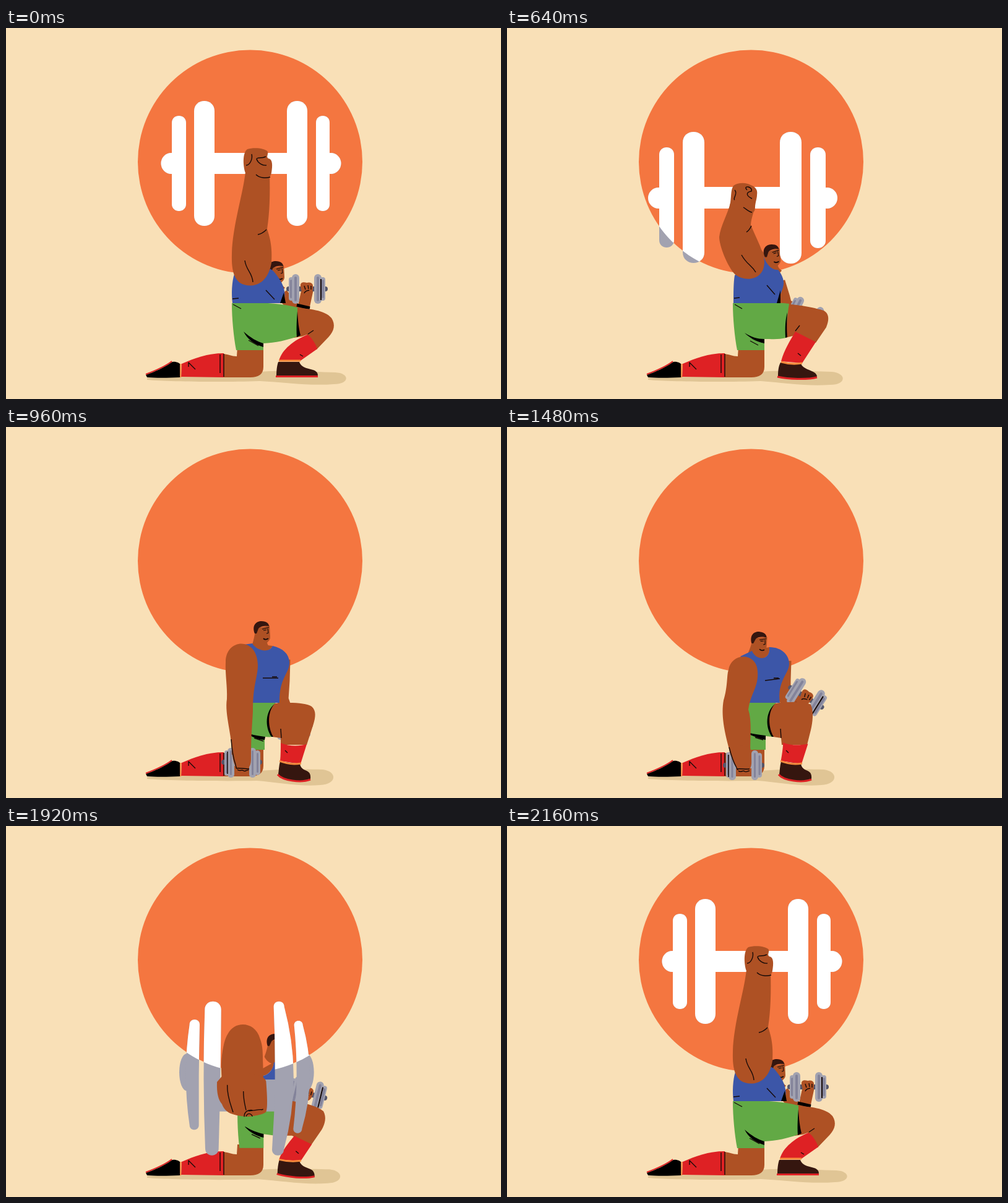
An HTML page with a canvas for the animation above (2600 ms loop, 800 by 600 pixels).

```html
<!DOCTYPE html>
<html>
<head>
<meta charset="utf-8">
<style>
html, body { margin: 0; height: 100%; overflow: hidden; background: #f9e0b7; }
canvas { display: block; }
</style>
</head>
<body>
<canvas id="stage" width="800" height="600"></canvas>
<script>
const g = document.getElementById('stage').getContext('2d');
const SKIN = '#ae5124', RED = '#de2124', BLUE = '#3c56a8', GREEN = '#62a945', DARK = '#35160f',
  INK = '#160a08', STEEL = '#a2a2b0', SHADE = '#83839a', ORANGE = '#f47640';

// Times at which the picture changes, and the key poses in between.
const steps = [0, 480, 560, 640, 680, 720, 800, 880, 960, 1240, 1320, 1400, 1480, 1560, 1640, 1760, 1840, 1920, 2000, 2080, 2160];
const keys = [[0, 'A'], [400, 'A'], [640, 'B'], [680, 'I'], [720, 'G'], [960, 'C'], [1160, 'C'], [1480, 'D'],
  [1760, 'E'], [2000, 'F'], [2080, 'H'], [2160, 'A'], [2600, 'A']];

const shadow = {
  A: 'M228 566 L410 556 C440 553 500 556 532 557 C556 558 556 576 530 576 C490 579 450 573 410 571 C350 573 260 572 228 569Z',
  B: 'M228 566 L410 556 C440 553 495 555 525 556 C549 558 549 577 523 577 C485 580 450 574 410 571 C350 573 260 572 228 569Z',
  C: 'M228 566 L410 556 C440 553 485 553 512 554 C536 557 535 578 508 579 C475 582 435 574 405 572 C350 573 260 572 228 569Z',
  F: 'M228 566 L410 556 C440 553 496 555 528 556 C552 558 552 577 526 577 C487 580 450 574 410 571 C350 573 260 572 228 569Z'
};
const thigh = {
  A: 'M465 452 C490 454 515 456 526 469 C533 480 530 490 522 499 L502 520 L486 496 L478 499 L465 501 C464 485 464 470 465 452Z',
  B: 'M450 446 C475 448 500 453 512 457 C522 463 520 474 516 484 L499 509 L467 492 L462 498 L450 501 C450 485 450 465 450 446Z',
  C: 'M433 447 C460 445 485 446 494 452 C502 459 500 470 497 480 L486 514 L444 514 L444 503 L430 501 C414 490 414 460 433 447Z',
  D: 'M433 447 C460 443 485 445 491 449 C496 460 494 478 491 490 L485 514 L444 514 L443 503 L430 501 C414 490 414 460 433 447Z',
  E: 'M447 436 C470 440 490 446 499 452 C503 462 501 475 497 485 L486 513 L450 512 L454 498 L434 492 C433 470 436 452 447 436Z',
  F: 'M450 447 C490 450 512 458 520 466 C526 476 523 485 517 494 L497 517 L475 498 L466 502 L450 505 C450 485 450 465 450 447Z'
};
const sock = {
  A: 'M487 496 C494 500 501 512 503 519 L476 538 L441 538 C446 520 465 505 487 496Z',
  B: 'M466 491 C478 497 490 503 499 508 L477 542 L443 539 C448 520 458 505 466 491Z',
  C: 'M444 511 C458 517 475 516 486 513 L476 545 L443 540 C444 530 444 520 444 511Z',
  E: 'M450 509 C460 514 475 513 487 512 L476 545 L442 540 C445 530 449 520 450 509Z',
  F: 'M474 497 C483 502 492 510 498 516 L476 541 L441 539 C446 524 460 509 474 497Z'
};
const cuff = {
  A: 'M441 538 Q458 538 476 538', B: 'M443 540 Q460 545 477 542',
  C: 'M442 540 Q458 547 477 544', F: 'M441 539 Q458 542 477 540'
};
const shoe = {
  A: 'M440 540 L474 540 C478 551 490 550 499 554 C504 557 504 560 504 563 C480 563 460 563 437 563 C437 553 438 546 440 540Z',
  B: 'M442 541 L475 543 C479 552 490 552 498 558 C502 562 501 564 500 566 C485 569 455 568 438 564 C438 553 439 547 442 541Z',
  C: 'M443 541 L475 545 C477 555 485 554 490 559 C493 563 492 568 492 571 C477 576 447 572 440 562 C441 555 441 548 443 541Z',
  F: 'M441 540 L474 541 C478 551 490 551 498 556 C502 560 502 563 502 565 C485 568 460 566 438 563 C438 553 439 546 441 540Z'
};
const sole = {
  A: 'M436 563.5 C460 563.5 485 563.5 504 563.5', B: 'M437 564 C455 568 485 569 501 565',
  C: 'M439 562 C447 572 477 576 492 570', F: 'M437 563 C460 566 485 568 502 565'
};
// The front foot stays planted while the body crouches.
for (const part of [shadow, cuff, shoe, sole]) part.D = part.E = part.C;

const shorts = {
  A: 'M365 445 C385 443 440 443 471 452 C471 470 471 485 470 499 C455 505 435 509 416 510 L416 521 L372 521 C368 500 365 470 365 445Z',
  B: 'M365 445 C385 443 430 443 456 446 C453 465 451 485 451 501 C440 504 430 503 416 503 L416 521 L372 521 C368 500 365 470 365 445Z',
  C: 'M390 444 C410 444 425 444 436 446 C420 458 418 485 430 501 C425 502 422 501 418 501 L418 522 L391 522 C388 500 388 470 390 444Z',
  D: 'M384 444 C408 444 425 444 435 446 C419 458 417 485 429 501 C425 501 422 500 418 500 L418 522 L389 522 C384 500 384 470 384 444Z',
  E: 'M395 426 C420 425 440 431 452 437 C442 455 436 475 434 492 C428 491 422 488 417 487 L417 520 L388 520 C386 480 390 450 395 426Z',
  F: 'M365 445 C385 443 430 441 453 445 C453 465 453 485 453 504 C440 507 430 506 416 504 L416 521 L372 521 C368 500 365 470 365 445Z'
};
const slit = {
  A: 'M471 458 C472 475 473 485 476 497 L470 500 C469 485 470 470 471 458Z',
  B: 'M453 460 C452 475 452 490 453 500 L450 501 C449 485 450 470 453 460Z',
  C: 'M434 448 C421 462 424 488 432 501 L429 501 C418 485 419 460 434 448Z',
  D: 'M433 448 C420 462 423 488 431 501 L428 501 C417 485 418 460 433 448Z',
  E: 'M450 440 C442 455 437 472 436 492 L433 491 C434 472 440 455 450 440Z',
  F: 'M453 460 C453 475 453 490 453 500 L452 501 C452 485 452 470 453 460Z'
};
const crease = {
  A: 'M384 491 C395 501 406 507 416 510 L416 516 C400 511 390 503 384 491Z',
  B: 'M384 493 C395 500 405 503 416 503 L416 510 C402 507 392 501 384 493Z',
  C: 'M393 496 C403 499 412 500 419 501 L418 506 C408 506 400 502 393 498Z',
  D: 'M389 494 C400 497 410 498 418 499 L418 506 C408 504 398 500 389 496Z',
  E: 'M391 478 C402 482 410 484 417 486 L417 492 C408 490 399 486 391 480Z',
  F: 'M384 490 C395 498 405 502 416 504 L416 510 C402 506 392 500 384 490Z'
};
const torso = {
  A: 'M428 390 C429 391 431 392 432 393 C440 402 449 415 450 426 C452 437 448 442 443 445 L366 445 C364 430 365 410 369 398Z',
  B: 'M411 359 C418 385 430 392 438 391 C444 398 448 407 447 415 C445 427 438 437 437 445 L366 445 C366 430 366 410 368 400Z',
  C: 'M398 350 C404 361 425 367 431 354 C448 358 457 367 458 380 C459 398 441 405 442 446 L388 446 C396 410 396 370 384 352Z',
  D: 'M396 362 C402 378 426 379 424 356 C445 356 456 370 456 382 C457 398 436 410 441 446 L384 446 C394 430 400 390 377 371Z',
  E: 'M404 349 C409 369 433 372 435 346 C452 345 462 355 463 370 C463 390 437 412 436 432 L394 427 C400 410 404 390 380 361Z',
  F: 'M400 425 C410 430 430 420 432 400 C440 405 446 409 446 412 C442 425 436 435 433 443 L366 446 C366 440 366 430 366 420Z'
};
const gap = {
  A: 'M449 428 L452 445 L443 445Z', B: 'M442 424 L442 445 L436 445Z',
  C: 'M442 445 L442 446 L442 446Z', E: 'M436 430 L436 431 L436 431Z', F: 'M433 443 L433 444 L432 444Z'
};
const bodyLines = {
  A: 'M420 424 L434 439 M366 438 L376 437 M367 447 L380 454 M392 505 L408 514 M497 489 L488 495 M475 528 L480 531',
  B: 'M420 416 L433 431 M367 437 L376 436 M368 447 L380 454 M393 506 L406 513 M473 481 L466 490 M470 526 L475 530',
  C: 'M415 406 L440 406 M430 404 L438 404 M397 447 L397 448 M401 503 L416 508 M444 488 L445 503 M451 523 L455 527',
  D: 'M417 410 L441 407 M431 406 L439 406 M388 447 L388 448 M401 502 L414 506 M442 488 L443 503 M451 523 L455 527',
  E: 'M422 403 L446 399 M436 398 L444 397 M396 430 L396 431 M401 488 L414 493 M453 497 L453 499 M459 523 L463 527',
  F: 'M420 428 L421 429 M367 440 L376 438 M368 448 L380 454 M395 504 L409 511 M488 487 L479 493 M473 527 L478 531'
};
const farArm = {
  A: 'M446 430 L460 447 L478 466 L487 424', B: 'M440 410 L448 436 L451 448 L482 462',
  C: 'M450 376 L449 410 L447 440 L462 482', D: 'M450 378 L449 410 L449 440 L478 440',
  E: 'M456 373 L454 408 L445 430 L480 447', F: 'M443 414 L449 440 L456 462 L489 424'
};
const band = {
  A: 'M470 448 L491 453', B: 'M470 466 L485 472', C: 'M455 470 L470 475',
  D: 'M466 447 L478 450', E: 'M470 454 L480 458', F: 'M476 451 L491 453'
};
const farBell = { A: '486 422 0', B: '482 465 27', C: '462 482 0', D: '483 437 32', E: '484 442 29', F: '487 428 6' };
const head = { A: '23 63 0', B: '15 36 -3', C: '0 0 0', D: '-7 17 7', E: '4 7 11', F: '29 30 0' };

const arm = {
  A: 'M387 232 C384 265 366 320 365 365 C364 395 370 405 378 412 C392 421 422 420 429 380 C431 350 425 335 422 325 C426 300 427 270 426 236Z',
  B: 'M361 283 C357 300 345 320 343 338 C343 352 356 385 368 398 C385 412 416 408 416 378 C415 360 400 335 394 318 C395 305 400 298 400 285Z',
  I: 'M352 320 C346 330 342 345 342 355 C344 370 355 390 366 400 C385 411 417 405 418 378 C416 360 405 345 400 335 C398 325 396 318 396 310Z',
  G: 'M340 350 C338 360 338 372 342 382 C345 395 355 400 365 405 C390 412 418 405 420 380 C418 365 412 345 405 335 C403 332 400 330 398 330Z',
  C: 'M365 530 C366 500 353 465 357 440 C358 420 354 400 355 380 C355 342 406 338 407 385 C407 405 399 415 399 460 C398 480 396 500 396 530Z',
  D: 'M362 532 C350 490 346 465 350 442 C357 420 355 400 358 393 C362 364 404 364 405 395 C407 420 394 430 390 457 C396 475 393 500 393 532Z',
  E: 'M362 530 C360 500 352 470 357 450 C362 420 361 400 362 390 C366 352 412 350 411 390 C411 410 400 425 396 455 C392 480 392 500 391 530Z',
  F: 'M345 400 C345 380 344 360 344 340 C345 325 350 315 357 309 C372 295 398 299 410 320 C418 330 422 340 425 350 C428 370 428 385 428 400Z'
};
const fist = {
  A: 'M386 232 C382 215 384 200 390 196 C400 193 418 194 423 200 C424 206 420 208 424 211 C431 212 431 222 429 234 C428 242 422 243 418 243 L388 236Z',
  B: 'M360 288 C363 275 361 262 366 255 C374 249 388 250 394 254 C404 258 405 264 404 270 C404 275 402 280 401 288 C401 295 400 297 396 299 L360 290Z',
  I: 'M350 323 C346 306 348 291 354 285 C366 278 384 278 392 284 C400 290 402 298 401 306 C401 314 400 321 399 328 C398 336 396 339 392 341 L350 331Z',
  G: 'M335 340 C333 355 335 370 342 380 C350 395 375 400 390 395 C402 390 402 375 402 365 C402 350 400 335 393 327 C380 320 355 320 345 327 L335 340Z',
  C: 'M365 520 C366 535 368 550 376 555 C382 558 390 557 393 550 C396 545 396 540 396 535 C396 530 396 524 395 518 C390 515 380 515 372 516 L365 520Z',
  D: 'M359 522 C364 538 369 552 377 557 C383 559 390 558 393 552 C396 547 395 540 395 535 C395 530 394 524 393 518 C390 515 376 515 368 516 L359 522Z',
  E: 'M361 522 C365 537 366 550 373 555 C380 558 389 557 391 550 C393 545 394 540 393 535 C392 530 392 524 391 518 C388 515 374 515 368 516 L361 522Z',
  F: 'M331 360 C328 380 332 390 337 397 C340 412 346 424 392 430 C410 431 430 429 434 426 C439 418 437 390 435 360 C430 340 380 338 344 344 L331 360Z'
};
const armLines = {
  A: 'M386 376 C388 392 398 395 399 411 M407 334 C413 333 418 329 421 326 M397 204 C399 212 394 222 388 222 M420 208 C412 212 406 208 405 212 C407 218 414 223 421 222 M404 237 C410 243 420 243 427 241',
  B: 'M379 367 C388 383 395 383 402 395 M387 330 C391 328 394 322 395 320 M368 262 C374 268 364 276 368 278 M388 262 C380 254 398 256 395 264 C388 265 384 270 396 276 M382 290 C388 294 392 298 396 298',
  G: 'M350 350 C352 360 352 370 358 380 M376 347 C378 360 378 370 380 380 M376 393 C374 385 380 383 384 383 M384 383 C390 382 394 381 396 380 C398 380 399 379 400 379 M382 393 C384 387 390 387 392 393',
  C: 'M364 505 C365 520 367 535 371 546 M371 546 C371 547 371 548 372 549 M372 552 C378 551 385 553 393 553 M374 554 C378 558 381 553 384 556 C387 558 389 554 392 555 M372 549 C372 550 372 551 372 552',
  D: 'M359 518 C362 530 367 544 371 551 M371 551 C371 552 372 552 372 553 M372 553 C378 552 385 554 392 553 M374 556 C378 560 381 554 384 557 C387 559 389 556 392 556 M372 553 C372 554 373 554 373 555',
  E: 'M361 518 C363 530 366 540 369 549 M369 549 C369 550 370 550 370 551 M371 551 C378 549 385 550 391 549 M372 554 C376 557 379 553 382 556 C385 558 388 554 391 555 M370 551 C370 552 371 552 371 553',
  F: 'M356 369 C354 390 363 410 366 420 M391 369 C391 390 395 405 397 414 M392 430 C388 418 395 413 402 415 M402 414 C410 413 420 411 427 410 C428 410 428 410 428 410 M397 429 C400 420 408 420 412 428'
};
// The lift overshoots its final height a little.
for (const part of [arm, fist, armLines]) {
  part.H = part.A.replace(/([\d.]+) ([\d.]+)/g, (_, x, y) => `${x} ${y - 5}`);
}

// Plates: top left, top right, top, bend left, bend right, bottom left, bottom right, bottom.
const plates = [{
  A: '268 291 142 268 291 268 291 296', B: '246 270 193 246 270 246 270 355', G: '230 258 270 230 258 230 258 446',
  C: '353 360 523 353 360 353 360 564', D: '354 361 526 354 361 354 361 567', E: '354 361 525 354 361 354 361 566',
  F: '268 289 207 250 286 268 287 454', H: '268 291 137 268 291 268 291 291'
}, {
  A: '304 337 118 304 337 304 337 320', B: '284 319 168 284 319 284 319 380', G: '272 310 235 272 310 272 310 480',
  C: '358 369 519 358 369 358 369 567', D: '358 370 523 358 370 358 370 571', E: '358 369 521 358 369 358 369 570',
  F: '303 337 165 297 336 304 331 514', H: '304 337 113 304 337 304 337 315'
}, {
  A: '454 487 118 454 487 454 487 320', B: '441 476 168 441 476 441 476 381', G: '434 472 235 434 472 434 472 480',
  C: '393 404 519 393 404 393 404 567', D: '395 406 523 395 406 395 406 571', E: '394 405 521 394 405 394 405 570',
  F: '452 472 165 460 518 448 471 514', H: '454 487 113 454 487 454 487 315'
}, {
  A: '501 523 142 501 523 501 523 296', B: '490 515 193 490 515 490 515 356', G: '486 514 270 486 514 486 514 446',
  C: '402 411 523 402 411 402 411 563', D: '404 412 527 404 412 404 412 567', E: '403 411 525 403 411 403 411 566',
  F: '497 514 210 510 549 495 512 462', H: '501 523 137 501 523 501 523 291'
}];
const bar = {
  A: '330 202 130 34', B: '312 257 135 35', G: '302 338 140 40', C: '365 537 32 11',
  D: '366 541 32 11', E: '365 540 32 11', F: '325 345 140 72', H: '330 197 130 34'
};
// Caps: left x, right x, y, radii.
const caps = {
  A: '267 525 219 16.5 17', B: '245 517 275 17 17', G: '230 515 358 19 20', C: '352 410 542 4 4',
  D: '353 412 547 4 4', E: '352 411 545 4 4', F: '262 523 325 16 43', H: '267 525 214 16.5 17'
};

let now = 0;

function at(pose) {
  const k = keys.filter(e => pose[e[1]]);
  let i = 0;
  while (i < k.length - 2 && k[i + 1][0] <= now) i++;
  const [t0, a] = k[i], [t1, b] = k[i + 1], leavesHold = i && k[i - 1][1] === a;
  const f = ((now - t0) / (t1 - t0)) ** (leavesHold ? 1.5 : 1);
  const end = pose[b].match(/-?[\d.]+/g);
  let n = 0;
  return pose[a].replace(/-?[\d.]+/g, v => (+v + (end[n++] - v) * f).toFixed(2));
}
const nums = pose => at(pose).split(' ').map(Number);

function fill(path, color) {
  g.fillStyle = color;
  g.fill(new Path2D(path));
}
function line(path, color = INK, width = 1.4) {
  g.strokeStyle = color;
  g.lineWidth = width;
  g.stroke(new Path2D(path));
}
function pill(x, y, w, h, color) {
  g.fillStyle = color;
  g.beginPath();
  g.roundRect(x, y, w, h, Math.min(w, h) / 2);
  g.fill();
}
function disc(x, y, rx, ry, color) {
  g.fillStyle = color;
  g.beginPath();
  g.ellipse(x, y, rx, ry, 0, 0, 7);
  g.fill();
}

function drawBackLeg() {
  fill('M351 527 C357 527 365 531 373 531 L374 515 L416 515 L416 548 C416 560 408 565 395 565 L352 565Z', SKIN);
  fill('M284 543 C305 534 325 526 352 526 L352 565 L283 564Z', RED);
  line('M282.5 543 L282 565', '#f08a45', 2.5);
  fill('M226 561 C240 556 256 549 267 541 C271 538 279 541 281 543 L281 565 C262 566 240 566 228 565Z', '#000');
  line('M226 560 C242 554 258 547 268 539', RED, 2);
  line('M346 528 L346 558 M352 527 L352 564 M295 548 L295 541 L306 552');
}

function drawFarBell() {
  const [x, y, angle] = nums(farBell);
  g.save();
  g.translate(x, y);
  g.rotate(angle * Math.PI / 180);
  pill(-33, -4, 67, 8, '#55566a');
  for (const [px, w, h] of [[-29, 8, 38], [22, 8, 38], [-24, 12, 48], [12, 12, 48]]) {
    pill(px, -h / 2, w, h, STEEL);
    pill(px + w / 2 - 2, 4 - h / 2, 4, h - 8, SHADE);
  }
  line('M23 -16 L23 18', INK, 2);
  fill('M-10 -4 C-11 -12 -4 -11 0 -10 C6 -12 11 -9 10 -3 C10 5 8 10 4 11 L-7 9Z', SKIN);
  line('M-4 -5 L-2 1 M2 -6 L3 0 M7 -5 L7 1 M-4 7 C-2 2 2 3 4 2');
  g.restore();
}

function drawHead() {
  const [x, y, angle] = nums(head);
  g.save();
  g.translate(413 + x, 335 + y);
  g.rotate(angle * Math.PI / 180);
  g.translate(-413, -335);
  fill('M403 326 L426 321 L427 340 C427 345 423 347 422 349 C423 353 425 355 428 357 C420 367 405 364 398 352 C400 345 402 338 403 326Z', SKIN);
  fill('M402 334 C397 321 404 314 413 314 C421 314 425 318 425 322 C419 321 411 322 408 326 L405 334Z', DARK);
  line('M414 327 L425 324 M416 329 L421 328 M423 326 L424 333 L421 334', INK, 1.1);
  line('M416 342 C418 344 421 344 424 342', INK, 1.8);
  g.restore();
}

function drawTorso() {
  const shape = at(torso);
  fill(shape.match(/M[^C]*C[^C]*/)[0] + 'Z', SKIN); // skin inside the neckline
  drawHead();
  fill(shape, BLUE);
}

function platePath([l1, r1, top, lm, rm, l2, r2, bottom]) {
  const a = (r1 - l1) / 2, b = (r2 - l2) / 2, mid = (top + bottom) / 2;
  return `M${l1} ${top + a} C${l1} ${top - a / 3} ${r1} ${top - a / 3} ${r1} ${top + a}
    Q${rm} ${mid} ${r2} ${bottom - b} C${r2} ${bottom + b / 3} ${l2} ${bottom + b / 3} ${l2} ${bottom - b} Q${lm} ${mid} ${l1} ${top + a}Z`;
}

function drawBarbell() {
  const shapes = plates.map(nums), [bx, by, bw, bh] = nums(bar), [cl, cr, cy, rx, ry] = nums(caps);
  const small = rx < 5;
  const paint = color => {
    for (const x of [cl, cr]) disc(x, cy, rx, ry, small ? '#55566a' : color);
    g.fillStyle = color;
    g.fillRect(bx, by, bw, bh);
    for (const s of shapes) fill(platePath(s), color);
  };
  paint(STEEL);
  if (small) {
    for (const [l, r, top, , , , , bottom] of shapes) {
      pill((l + r) / 2 - 1.5, top + 4, 3, bottom - top - 8, SHADE);
    }
    line(`M${shapes[1][0]} ${cy - 17} v36`, INK, 1.5);
  }
  g.save();
  g.beginPath();
  g.arc(394.5, 216.5, 181.5, 0, 7);
  g.clip();
  paint('#fff');
  g.restore();
}

function draw() {
  g.fillStyle = '#f9e0b7';
  g.fillRect(0, 0, 800, 600);
  disc(394.5, 216.5, 181.5, 181, ORANGE);
  fill(at(shadow), '#e0c595');
  drawBackLeg();
  line(at(farArm), SKIN, 19);
  line(at(band), '#000', 5);
  drawFarBell();
  fill(at(thigh), SKIN);
  fill(at(sock), RED);
  fill(at(shoe), DARK);
  line(at(cuff), '#f58a3c', 3);
  line(at(sole), RED, 3);
  fill(at(shorts), GREEN);
  fill(at(slit), '#000');
  fill(at(crease), '#000');
  drawTorso();
  fill(at(gap), '#000');
  line(at(bodyLines));
  drawBarbell();
  fill(at(arm), SKIN);
  fill(at(fist), SKIN);
  line(at(armLines));
}

function tick() {
  const t = performance.now() % 2600;
  now = steps.filter(s => s <= t).pop();
  draw();
  requestAnimationFrame(tick);
}
g.lineJoin = 'round';
tick();
</script>
</body>
</html>
```
